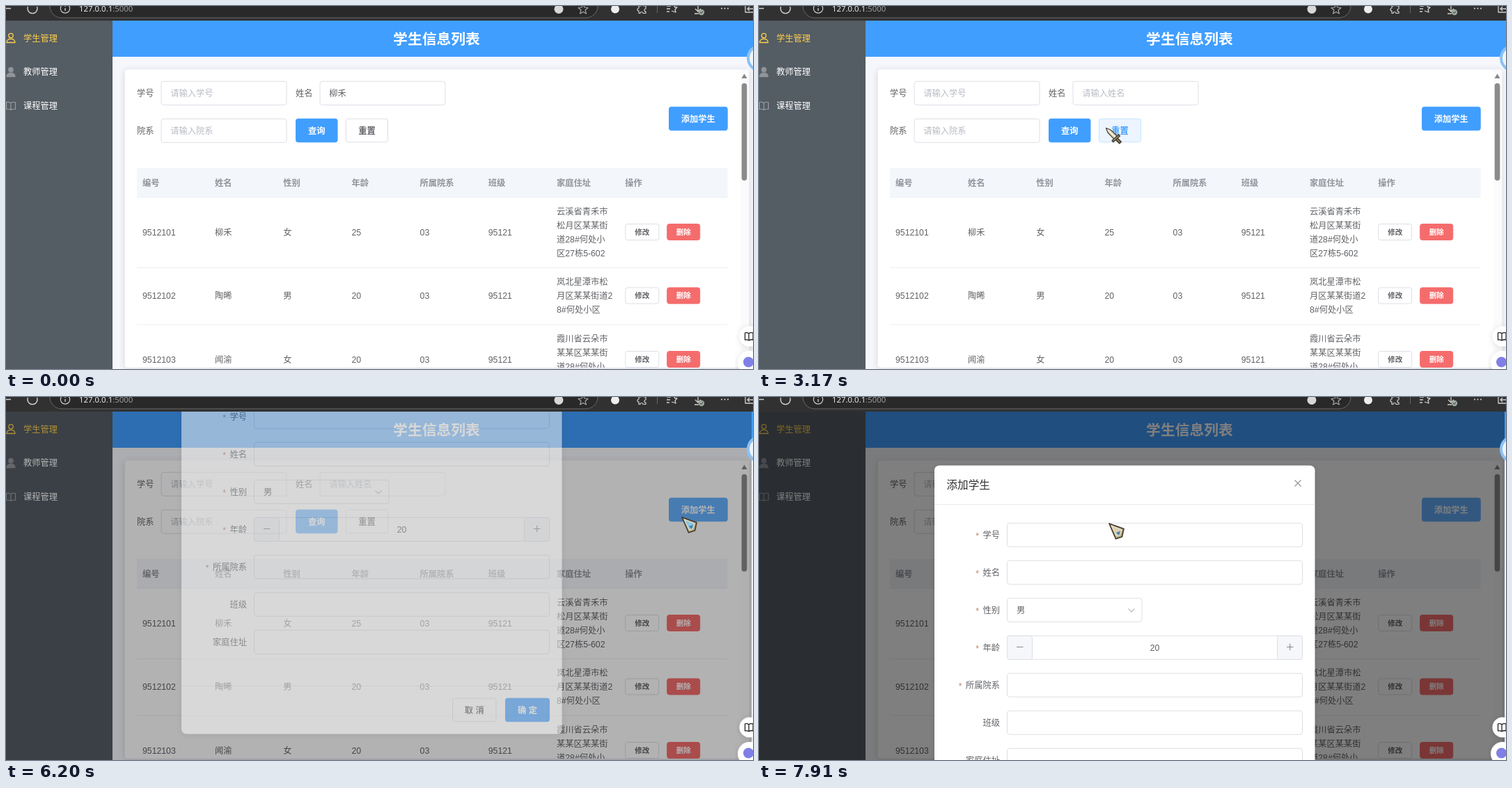
Recreate the animation shown at these times as an HTML page. Size 1073 px wide and 522 px high, loop 8 s.

```html
<!DOCTYPE html>
<html lang="zh">
<head>
<meta charset="utf-8">
<style>
html, body { margin: 0; width: 100%; height: 100%; overflow: hidden; background: #f6f7fc; }
svg { display: block; width: 1073px; height: 522px; }
text { font-family: "Liberation Sans", "Noto Sans CJK SC", "Noto Sans CJK", sans-serif; white-space: pre; }
</style>
</head>
<body>
<svg id="stage" viewBox="0 0 1073 522"></svg>
<script>
const LOOP = 8000, TICK = 131.8, LEAD = 32;
const BLUE = '#409eff', HOVER = '#66b1ff', ACTIVE = '#3a8ee6';
const INK = '#606266', LINE = '#dcdfe6', FAINT = '#b8bcc4', RED = '#f56c6c';

const rect = (x, y, w, h, fill, stroke = 'none', r = 0) =>
  `<rect x="${x}" y="${y}" width="${w}" height="${h}" rx="${r}" fill="${fill}" stroke="${stroke}"/>`;
const text = (s, x, cy, { size = 12.25, fill = INK, bold = false, anchor = 'start' } = {}) =>
  `<text x="${x}" y="${cy + size * 0.37}" font-size="${size}" fill="${fill}" text-anchor="${anchor}" font-weight="${bold ? 700 : 400}">${s}</text>`;
const path = (d, stroke, width = 1, fill = 'none') =>
  `<path d="${d}" fill="${fill}" stroke="${stroke}" stroke-width="${width}" stroke-linejoin="round"/>`;
const circle = (x, y, r, fill, stroke = 'none', width = 1) =>
  `<circle cx="${x}" cy="${y}" r="${r}" fill="${fill}" stroke="${stroke}" stroke-width="${width}"/>`;
const group = (x, y, body, extra = '') => `<g transform="translate(${x} ${y})" ${extra}>${body}</g>`;
const between = (k, a, b) => k >= a && k <= b;

function button(label, x, cy, w, h, fill, { ink = '#fff', border = fill, size = 12.25, bold = true } = {}) {
  return rect(x + .5, cy - h / 2 + .5, w - 1, h - 1, fill, border, 3) +
    text(label, x + w / 2, cy, { size, fill: ink, bold, anchor: 'middle' });
}
const input = (x, cy, w, hover) => rect(x + .5, cy - 17, w - 1, 34, '#fff', hover ? '#b4b8c0' : LINE, 3.5);

// Cursor waypoints: tick, x, y, shape
const TRACK = [
  [1, 1037, 518, 'arrow'], [4, 782, 297, 'arrow'], [5, 600, 225, 'arrow'], [7, 434, 165, 'arrow'],
  [8, 484, 130, 'beam'], [9, 470, 155, 'arrow'], [10, 445, 172, 'sword'], [12, 450, 172, 'sword'],
  [13, 466, 168, 'sword'], [14, 466, 168, 'sword'], [15, 477, 169, 'arrow'], [16, 470, 169, 'sword'],
  [18, 450, 174, 'sword'], [19, 450, 174, 'sword'], [20, 496, 175, 'sword'], [21, 498, 175, 'sword'],
  [26, 498, 175, 'sword'], [27, 530, 172, 'sword'], [28, 610, 166, 'arrow'], [32, 978, 160, 'sword'],
  [33, 975, 159, 'sword'], [34, 720, 148, 'arrow'], [35, 420, 132, 'arrow'], [36, 290, 138, 'beam'],
  [38, 290, 138, 'beam'], [39, 297, 171, 'beam'], [40, 297, 180, 'beam'], [41, 297, 180, 'beam'],
  [42, 470, 182, 'arrow'], [43, 760, 178, 'arrow'], [44, 976, 171, 'sword'], [45, 981, 173, 'sword'],
  [46, 981, 173, 'sword'], [47, 970, 172, 'arrow'], [48, 791, 167, 'arrow'], [49, 532, 166, 'arrow'],
  [50, 500, 120, 'arrow'], [51, 463, 75, 'arrow'], [52, 470, 45, 'beam'], [56, 485, 60, 'arrow'],
  [57, 490, 90, 'arrow'], [60, 502, 181, 'arrow'], [61, 502, 181, 'arrow']
];

const POINTERS = {
  arrow: k => path('M1 1L22 8.5L19.5 20L10.5 23Z', '#40382a', 1.6, '#b9ac87') +
    path('M4 4L19 10L16 18L11.5 19Z', '#eee6cf', 1, between(k, 57, 61) ? '#d8cfb4' : '#8cc4e2') +
    path('M11 14L17 12L15 18Z', 'none', 0, '#3f7fa8'),
  sword: () => path('M.5.5L7 3L17.5 13L13 17.5L3 7Z', '#4a4336', 1.2, '#d6cdb0') +
    path('M3 3L14 14', '#fffbe6', 1.4) +
    path('M9.5 20L20 10.5', '#3a3228', 4) + path('M10.5 19L19 11.5', '#a89468', 1.6) +
    path('M15.5 16L21.5 22', '#40362a', 5) + path('M16 16.5L20.5 21', '#8b7a55', 2),
  beam: () => path('M0-12.5L4.5-8L3.5-6V6L4.5 8L0 12.5L-4.5 8L-3.5 6V-6L-4.5-8Z', '#3c4344', 1.5, '#9bb0ae') +
    path('M0-8V8', '#35b5c4', 4)
};

function cursor(k) {
  if (k < 1) return '';
  const i = TRACK.findIndex((p, n) => n === TRACK.length - 1 || TRACK[n + 1][0] > k);
  const a = TRACK[i], b = TRACK[i + 1] || a;
  const u = b === a ? 0 : (k - a[0]) / (b[0] - a[0]);
  const clicked = between(k, 11, 12) || k === 23 || k === 46;
  return group(a[1] + (b[1] - a[1]) * u, a[2] + (b[2] - a[2]) * u,
    (clicked ? circle(0, 0, 10, '#d5df2b') : '') + POINTERS[a[3]](k));
}

function chrome() {
  const w = '#d0d0d0';
  return rect(0, 0, 1073, 21, '#313131') +
    rect(63, -17, 787, 34, '#292929', '#686868', 17) +
    path('M0 3.5H7M44.5 1A7 7 0 1 1 31.5 1M1009 0', w, 1.3) +
    circle(85, 3.5, 6.7, 'none', w, 1.2) + path('M85 3V7M85 0V1', w, 1.3) +
    `<text x="105" y="8" font-size="11.4" fill="#f4f4f4" style="font-family:'Open Sans',sans-serif">127.0.0.1<tspan fill="#a4a4a4">:5000</tspan></text>` +
    circle(794, 4.5, 6.5, '#d8d8d8') +
    path('M829-3L831 2L836 2.5L832 6L833.5 11L829 8.5L824.5 11L826 6L822 2.5L827 2Z', '#a9a9a9', 1.1) +
    circle(875, 4.5, 6, '#eeeeee') +
    path('M909 0H912A2 2 0 0 1 916 0H919V4A2 2 0 0 0 919 8V10.5H915A2 2 0 0 0 911 10.5H909V7A2 2 0 0 1 909 3Z', w, 1.2) +
    path('M935.5 0V10', '#666') +
    path('M949 0H955M949 4H954M949 8H953M959-2L960.5 1.5L964 2L961 5L962 9L956 7', w, 1.3) +
    path('M994-1V7M990 4L994 8L998 4M989 11H995', w, 1.3) + circle(999, 9, 4.2, '#9aa99d') + path('M997 9L998.5 10.5L1001 7.5', '#333') +
    [1028, 1032.5, 1037].map(x => circle(x, 3.5, 1.1, w)).join('') +
    path('M1073-2H1062V9H1073M1065 4H1073M1068 1L1065 4L1068 7', w, 1.3);
}

function sidebar() {
  const user = (y, fill, stroke) => circle(7, y - 3.5, 3.2, fill, stroke, 1.3) +
    path(`M1 ${y + 6.5}C1 ${y - .5} 13 ${y - .5} 13 ${y + 6.5}Z`, stroke, 1.3, fill);
  return rect(0, 21, 153, 501, '#545c64') +
    user(46, 'none', '#ffd04b') + user(95, '#909399', '#909399') +
    path('M7 139.5C5 138 2 138 .5 138.5V148.5C3 148 5 148 7 149.5C9 148 11 148 13.5 148.5V138.5C11 138 9 138 7 139.5V149', '#9a9da2', 1.2) +
    ['学生管理', '教师管理', '课程管理'].map((s, i) =>
      text(s, 25, 46 + 48.8 * i, { fill: i ? '#fff' : '#ffd04b' })).join('');
}

const HEADS = ['编号', '姓名', '性别', '年龄', '所属院系', '班级', '家庭住址', '操作'];
const ROWS = [
  { cy: 325, end: 376, cells: ['9512101', '柳禾', '女', '25', '03', '95121'], place: ['云溪省青禾市', '松月区某某街', '道28#何处小', '区27栋5-602'] },
  { cy: 416.5, end: 457.5, cells: ['9512102', '陶晞', '男', '20', '03', '95121'], place: ['岚北星潭市松', '月区某某街道2', '8#何处小区'] },
  { cy: 508, end: 560, cells: ['9512103', '闻渝', '女', '20', '03', '95121'], place: ['霞川省云朵市', '某某区某某街', '道28#何处小'] }
];

function table(filtered) {
  const right = filtered ? 1049.5 : 1036.5;
  const col = i => filtered ? 196 + 100.85 * i : i ? 300 + 98.2 * (i - 1) : 196;
  const wide = ['云溪省青禾市', '松月区某某街', '道28#何处小区', '27栋5-602'];
  let out = rect(188, 233, right - 188, 42, '#f3f6fa') + path(`M188 275H${right}`, '#ebeef5') +
    HEADS.map((s, i) => text(s, col(i), 254, { fill: '#909399', bold: true })).join('');
  for (const row of filtered ? ROWS.slice(0, 1) : ROWS) {
    const place = filtered ? wide : row.place, top = row.cy - (row.end === 560 ? 30 : 10 * (place.length - 1));
    out += row.cells.map((s, i) => text(s, col(i), row.cy)).join('') +
      place.map((s, i) => text(s, col(6), top + 20 * i)).join('') +
      button('修改', col(7), row.cy, 49, 24, '#fff', { ink: INK, border: LINE, size: 10.5 }) +
      button('删除', col(7) + 60, row.cy, 48, 24, RED, { size: 10.5 }) +
      path(`M188 ${row.end + .5}H${right}`, filtered ? '#dfe2e8' : '#ebeef5');
  }
  return out;
}

function page(k) {
  const filtered = between(k, 12, 23), named = k < 24, resetOn = between(k, 21, 45);
  const query = between(k, 11, 12) ? ACTIVE : between(k, 10, 22) ? HOVER : BLUE;
  const add = k === 46 ? ACTIVE : k === 33 || k >= 44 ? HOVER : BLUE;
  const field = (label, hint, x, cy, hover, value) => text(label, x, cy) + input(x + 34.5, cy, 181, hover) +
    text(value || hint, x + 48.3, cy, { fill: value ? INK : FAINT });
  return rect(153, 21, 920, 501, '#f6f7fc') + rect(153, 21, 920, 52, BLUE) +
    text('学生信息列表', 618.5, 47, { size: 20.8, fill: '#fff', bold: true, anchor: 'middle' }) +
    `<g filter="url(#shadow)">${rect(170.5, 91, 896.5, 429, '#fff', '#ebeef5', 3.5)}</g>` +
    `<g clip-path="url(#card)">` +
    field('学号', '请输入学号', 188, 125.3, between(k, 35, 38)) +
    field('姓名', '请输入姓名', 416, 125.3, k === 8, named && '柳禾') +
    field('院系', '请输入院系', 188, 179.3) +
    button('查询', 416, 179, 60.5, 34.5, query) +
    button('重置', 488, 179, 61, 34.5, resetOn ? '#ecf5ff' : '#fff',
      { ink: resetOn ? BLUE : INK, border: k === 23 ? ACTIVE : resetOn ? '#c6e2ff' : LINE }) +
    button('添加学生', filtered ? 965 : 952, 162, 84.7, 34.5, add) +
    table(filtered) +
    (filtered ? '' : rect(1055, 92, 12, 428, '#fbfbfb') + path('M1060.5 97.5L1064.5 104H1056.5Z', 'none', 0, '#858585') +
      rect(1056.7, 111, 7.6, 140, '#8b8b8b', 'none', 3.8)) +
    '</g>';
}

function dialog(k) {
  if (k < 47) return '';
  const u = Math.min(1, Math.max(0, (k - 56) / 4));
  const y = -161 * (1 - u * u * (3 - 2 * u)) - (k === 47 ? 9 : 0);
  const opacity = k === 47 ? .5 : k === 48 ? .975 : 1;
  const labels = ['学号', '姓名', '性别', '年龄', '所属院系', '班级', '家庭住址'];
  const rows = labels.map((label, i) => {
    const cy = 198.3 + 54 * i;
    return text(label, 346, cy, { anchor: 'end' }) +
      (i < 5 ? text('*', 340.5 - 12.25 * label.length, cy + 1, { fill: '#c0836a', anchor: 'end' }) : '') +
      input(356, cy, i === 2 ? 194.5 : 425, !i && between(k, 52, 56));
  }).join('');
  const step = x => rect(x, 343.5, 36, 34, '#f5f7fa', LINE, 3);
  return rect(0, 21, 1071, 501, `rgba(0,0,0,${k === 47 ? .3 : .5})`) +
    group(0, y, `<g filter="url(#shadow)">${rect(252, 98.5, 546.5, 556, '#fff', 'none', 7)}</g>` +
      text('添加学生', 269.5, 126.5, { size: 15.6, fill: '#303133' }) +
      path('M769.5 119.5L778.5 128.5M778.5 119.5L769.5 128.5', '#909399', 1.1) +
      path('M252 154.5H798.5M252 585.5H798.5', '#e8eaee') + rows +
      text('男', 370, 306.3) + path('M530.5 304.5L535 309L539.5 304.5', FAINT, 1.1) +
      step(356.5) + step(744.5) +
      path('M370 359.5H379.5M758 359.5H767.5M762.7 354.7V364.3', '#85888e', 1.1) +
      text('20', 568.5, 360, { anchor: 'middle' }) +
      button('取 消', 641, 620, 63.5, 34.5, '#fff', { ink: INK, border: LINE }) +
      button('确 定', 717, 620, 64, 34.5, BLUE), `opacity="${opacity}"`);
}

function floats() {
  return circle(1084, 75, 18, '#eef5fc', '#8cc1f3', 4) +
    `<g filter="url(#shadow)">${circle(1068, 475, 14.5, '#fff')}${circle(1068, 513, 17, '#fff')}</g>` +
    path('M1067 471C1065 469.5 1063 469.5 1061.5 470V480C1064 479.5 1065 479.7 1067 481C1069 479.7 1071 479.5 1073 480V470C1071 469.5 1069 469.5 1067 471V480', '#222', 1.3) +
    circle(1066.5, 512, 7.5, '#7f7fe6');
}

const DEFS = `<defs><filter id="shadow" x="-10%" y="-10%" width="120%" height="120%">
  <feDropShadow dx="0" dy="1.5" stdDeviation="4" flood-color="#000" flood-opacity=".13"/></filter>
  <clipPath id="card">${rect(170, 91, 897, 429, '#000')}</clipPath></defs>`;
const stage = document.getElementById('stage');
let shown = -1;

function draw(time) {
  const k = Math.floor((time % LOOP + LEAD) / TICK);
  if (k !== shown) {
    shown = k;
    stage.innerHTML = DEFS + page(k) + sidebar() + dialog(k) + floats() + chrome() + cursor(k);
  }
}

const start = performance.now();
function loop() {
  draw(performance.now() - start);
  requestAnimationFrame(loop);
}
loop();
</script>
</body>
</html>
```
